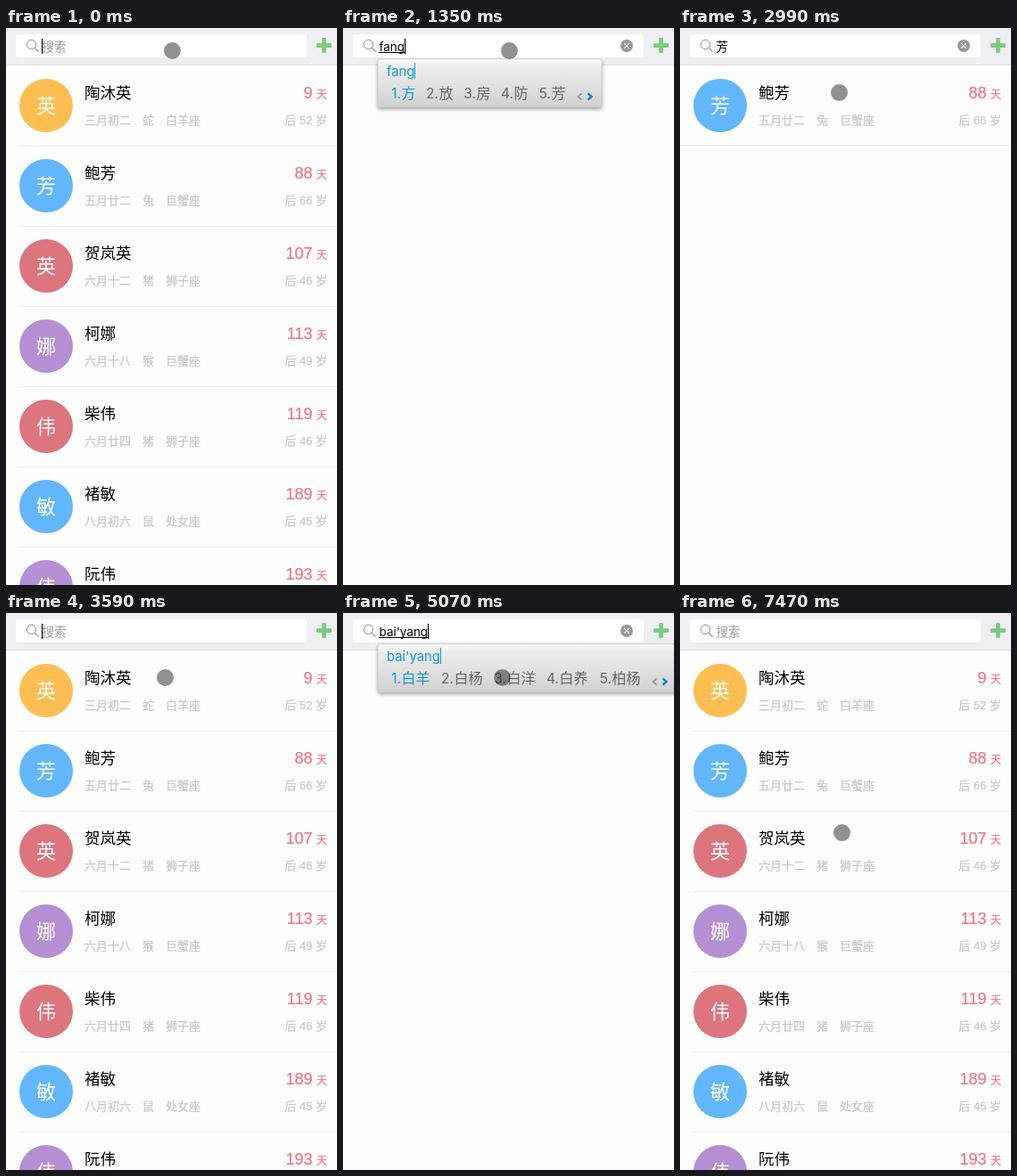
Animation, 371 px wide and 625 px high, one loop 8 s. Source, as an HTML page:

```html
<!DOCTYPE html>
<html lang="zh-CN">
<head>
<meta charset="utf-8">
<style>
html, body { margin: 0; width: 100%; height: 100%; overflow: hidden; background: #fdfdfd; }
svg { display: block; font-family: "Liberation Sans", "Noto Sans CJK SC", sans-serif; }
.latin { font-family: Inter, "Noto Sans CJK SC", sans-serif; }
.sub { font-size: 13px; fill: #c7c7c7; stroke: #c7c7c7; stroke-width: .25px; }
.days { fill: #f3727e; stroke: #f3727e; stroke-width: .2px; text-anchor: end; }
.popup { filter: drop-shadow(0 2px 2px rgba(0, 0, 0, .35)); }
</style>
</head>
<body>
<svg id="stage" width="371" height="625" viewBox="0 0 371 625"></svg>
<script>
const LOOP = 8000;
const FIELD_SIZE = 13.5, POPUP_SIZE = 14.8;
const orange = '#ffbe52', blue = '#62b6fc', red = '#dc757c', purple = '#b48fd3', ink = '#129ad6';

const people = [
  ['陶沐英', orange, '三月初二 蛇 白羊座', 9, 52],
  ['鲍芳', blue, '五月廿二 兔 巨蟹座', 88, 66],
  ['贺岚英', red, '六月十二 猪 狮子座', 107, 46],
  ['柯娜', purple, '六月十八 猴 巨蟹座', 113, 49],
  ['柴伟', red, '六月廿四 猪 狮子座', 119, 46],
  ['褚敏', blue, '八月初六 鼠 处女座', 189, 45],
  ['阮伟', purple, '八月初十 鼠 处女座', 193, 45]
];

// start time, field text, caret shown, input method text, candidates
const steps = [
  [0, '', 1],
  [150, 'f', 1, 'fa', '发 法 罚 乏 阀'],
  [300, 'fa', 1, 'fang', '方 放 房 防 芳'],
  [450, 'fang', 1, 'fang', '方 放 房 防 芳'],
  [900, 'fang', 0, 'fang', '方 放 房 防 芳'],
  [1350, 'fang', 1, 'fang', '方 放 房 防 芳'],
  [1500, '芳', 1],
  [2100, '芳', 0],
  [2550, '芳', 1],
  [2990, '芳', 0],
  [3590, '', 1],
  [4190, 'b', 1, 'b', '不 把 被 吧 比'],
  [4340, 'ba', 1, 'ba', '把 吧 八 爸 巴'],
  [4480, 'ba', 1, 'bai', '白 百 败 摆 拜'],
  [4780, "bai'y", 1, "bai'ya", '白鸭 白牙 百亚 白芽 摆压'],
  [4930, "bai'yan", 1, "bai'yan", '白眼 白颜 白盐 百言 白燕'],
  [5070, "bai'yang", 1, "bai'yang", '白羊 白杨 白洋 白养 柏杨'],
  [5520, '白羊', 1],
  [5970, '白羊', 0],
  [6420, '白羊', 1],
  [6870, '白', 1],
  [7020, '', 1],
  [7470, '', 0]
];

// start time, x, y
const pointer = [
  [0, 186.5, 25.5], [2400, 191, 31], [2550, 189, 44], [2700, 184, 60], [2850, 179, 70],
  [2990, 178.5, 72.5], [6120, 178, 79], [6270, 177, 73], [6420, 176.5, 67.5], [7470, 181.5, 246.5]
];

const current = (list, t) => list.filter(item => item[0] <= t).pop();

const ruler = document.createElement('canvas').getContext('2d');
function textWidth(text, size) {
  ruler.font = `${size}px Inter, "Noto Sans CJK SC", sans-serif`;
  return ruler.measureText(text).width;
}

const text = (x, y, size, fill, content, extra = '') =>
  `<text x="${x}" y="${y}" font-size="${size}" fill="${fill}" ${extra}>${content}</text>`;
const rect = (x, y, w, h, fill, extra = '') =>
  `<rect x="${x}" y="${y}" width="${w}" height="${h}" fill="${fill}" ${extra}/>`;
const circle = (x, y, r, fill, extra = '') =>
  `<circle cx="${x}" cy="${y}" r="${r}" fill="${fill}" ${extra}/>`;
const line = (d, color, width) =>
  `<path d="${d}" fill="none" stroke="${color}" stroke-width="${width}"/>`;

function row([name, color, details, days, age], index, alone) {
  const top = index * 90;
  return circle(45, top + 87, 30, color)
    + text(45, top + 95, 22, '#fff', name.slice(-1), 'text-anchor="middle"')
    + text(88, top + 79, 17.5, '#000', name)
    + `<text class="sub" x="88" y="${top + 108}">${details.replace(/ /g, '\u3000')}</text>`
    + `<text class="days" x="343.5" y="${top + 79}" font-size="18">${days}</text>`
    + `<text class="days" x="360" y="${top + 79}" font-size="12">天</text>`
    + `<text class="sub" x="360" y="${top + 108}" text-anchor="end">后 ${age} 岁</text>`
    + (alone ? rect(0, 131, 371, 1, '#ededed') : rect(15, top + 132, 356, 1, '#ededed'));
}

function results(query, composing) {
  if (composing) return '';
  if (!query) return people.map((person, i) => row(person, i)).join('');
  return people.filter(p => (p[0] + p[2]).includes(query)).map((p, i) => row(p, i, true)).join('');
}

function searchBar(query, caret, composing) {
  const end = Math.round(40 + textWidth(query, FIELD_SIZE));
  let out = rect(0, 0, 371, 41, '#eeeef3') + rect(0, 41, 371, 1, '#d9d9dd')
    + rect(11, 7, 326, 26, '#fff', 'rx="3"')
    + circle(28.5, 18.5, 5.2, 'none', 'stroke="#8e8e93"')
    + line('M32.3 22.3L36.6 26.6', '#8e8e93', 1.2)
    + rect(348, 17.3, 17, 4.6, '#79cb7b', 'rx="1"') + rect(354.2, 11, 4.6, 17, '#79cb7b', 'rx="1"');
  if (query) {
    out += text(40.5, 25.5, FIELD_SIZE, '#000', query, 'class="latin"')
      + circle(318, 20, 7, '#98989b')
      + line('M315.2 17.2L320.8 22.8M320.8 17.2L315.2 22.8', '#fff', 1.1);
  } else {
    out += text(40.5, 25.5, FIELD_SIZE, '#98989d', '搜索');
  }
  if (composing) out += rect(40, 27, end - 40, 1, '#000');
  if (caret) out += rect(end, 12, 1.2, 17, '#000');
  return out;
}

function inputPopup(typed, choices) {
  const words = choices.split(' ');
  const length = words[0].length;
  const pitch = 25 + 17 * length;
  const end = 65 + 4 * pitch + 16 * length;
  const caretX = Math.round(49 + textWidth(typed, POPUP_SIZE)) + .5;
  return `<defs><linearGradient id="metal" x2="0" y2="1">
      <stop stop-color="#fafafa"/><stop offset=".15" stop-color="#ededed"/>
      <stop offset=".6" stop-color="#dfdfdf"/><stop offset="1" stop-color="#d0d0d0"/>
    </linearGradient></defs>`
    + rect(39, 35, end + 2, 54, 'url(#metal)', 'rx="3" class="popup" stroke="#c4c4c4" stroke-width=".6"')
    + text(49, 54, POPUP_SIZE, ink, typed, 'class="latin"')
    + line(`M${caretX} 39V57`, ink, 1)
    + words.map((word, i) => {
        const x = 65 + i * pitch, color = i ? '#666' : ink;
        return text(x, 79, 15.5, color, `${i + 1}.`, 'class="latin" text-anchor="end"')
          + text(x + .5, 79, 16, color, word);
      }).join('')
    + line(`M${end + 18.5} 73.5l-4 3.5l4 3.5`, '#999', 1.8)
    + line(`M${end + 25.5} 73.5l4 3.5l-4 3.5`, '#0b86c2', 2.4);
}

const stage = document.getElementById('stage');
let shown = '';

function draw() {
  const t = performance.now() % LOOP;
  const [, query, caret, typed, choices] = current(steps, t);
  const [, x, y] = current(pointer, t);
  const picture = rect(0, 0, 371, 625, '#fdfdfd')
    + results(query, typed)
    + searchBar(query, caret, typed)
    + (typed ? inputPopup(typed, choices) : '')
    + circle(x, y, 9.7, 'rgba(30,30,30,.49)', 'stroke="rgba(255,255,255,.5)" stroke-width=".8"');
  if (picture !== shown) stage.innerHTML = shown = picture;
  requestAnimationFrame(draw);
}
draw();
</script>
</body>
</html>
```
